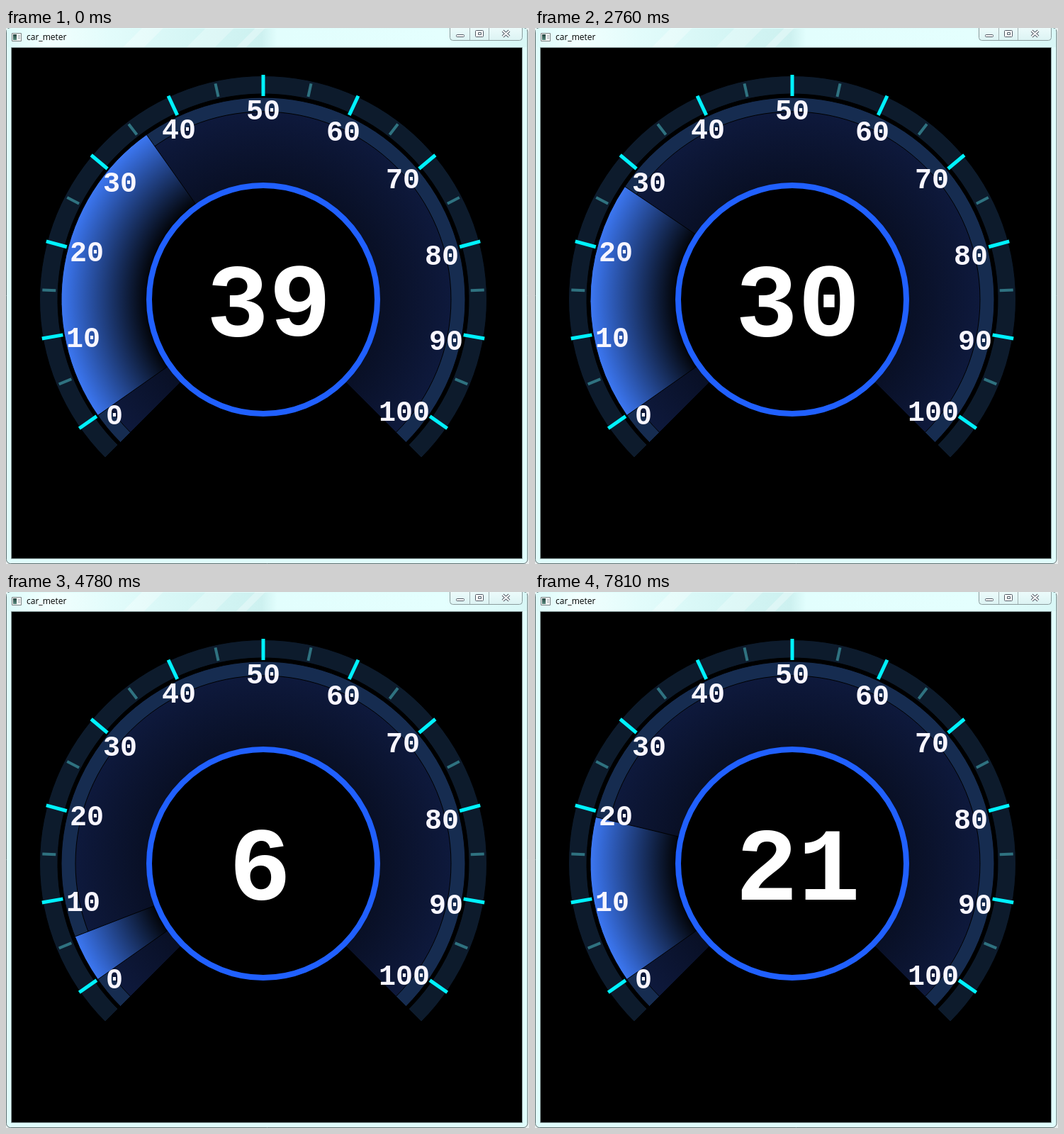
Recreate the animation shown at these times as an HTML page with a canvas. Size 738 px wide and 756 px high, loop 8040 ms.

```html
<!DOCTYPE html>
<html lang="en">
<head>
<meta charset="utf-8">
<title>car_meter</title>
<style>
  html, body { margin: 0; width: 100%; height: 100%; overflow: hidden; background: #000; }
  canvas { display: block; }
</style>
</head>
<body>
<canvas id="stage" width="738" height="756"></canvas>
<script>
const ctx = document.getElementById('stage').getContext('2d');
const LOOP = 8040;
const CX = 363, CY = 383;
const START = 145, TICK_STEP = 12.5, DEG_PER_UNIT = 2.3;
const MONO = '"Liberation Mono", monospace';

// [start time in ms, speed]
const readings = [[0, 39], [760, 58], [1750, 4], [2760, 30], [3770, 77],
                  [4780, 6], [5790, 73], [6800, 86], [7810, 21]];

// Centres of the scale labels 0, 10, ... 100
const labels = [[153, 545], [109, 436], [114, 315], [161, 217], [244, 142], [363, 115],
                [476, 145], [560, 212], [615, 320], [621, 440], [562, 540]];

const rad = deg => deg * Math.PI / 180;

function linear(x0, y0, x1, y1, ...stops) {
  const g = ctx.createLinearGradient(x0, y0, x1, y1);
  stops.forEach(([at, color]) => g.addColorStop(at, color));
  return g;
}

function radial(r0, r1, from, to) {
  const g = ctx.createRadialGradient(CX, CY, r0, CX, CY, r1);
  g.addColorStop(0, from);
  g.addColorStop(1, to);
  return g;
}

function box(x, y, w, h, radius, fill, stroke) {
  ctx.beginPath();
  ctx.roundRect(x, y, w, h, radius);
  if (fill) { ctx.fillStyle = fill; ctx.fill(); }
  if (stroke) { ctx.strokeStyle = stroke; ctx.lineWidth = 1; ctx.stroke(); }
}

function pie(r, from, to, fill) {
  ctx.beginPath();
  ctx.moveTo(CX, CY);
  ctx.arc(CX, CY, r, rad(from), rad(to));
  ctx.closePath();
  ctx.fillStyle = fill;
  ctx.fill();
  ctx.strokeStyle = '#000';
  ctx.lineWidth = 1;
  ctx.stroke();
}

function tick(deg, r0, r1, width, color) {
  const c = Math.cos(rad(deg)), s = Math.sin(rad(deg));
  ctx.beginPath();
  ctx.moveTo(CX + r0 * c, CY + r0 * s);
  ctx.lineTo(CX + r1 * c, CY + r1 * s);
  ctx.strokeStyle = color;
  ctx.lineWidth = width;
  ctx.stroke();
}

function text(str, x, y, font, color, align = 'center') {
  ctx.font = font;
  ctx.fillStyle = color;
  ctx.textAlign = align;
  ctx.fillText(str, x, y);
}

function sheen(x, width, color) {
  ctx.beginPath();
  ctx.moveTo(x, 27);
  ctx.lineTo(x + 27, 0);
  ctx.lineTo(x + 27 + width, 0);
  ctx.lineTo(x + width, 27);
  ctx.fillStyle = color;
  ctx.fill();
}

function drawWindow() {
  ctx.fillStyle = '#e8eeee';
  ctx.fillRect(0, 0, 738, 756);
  box(0.5, -0.5, 735.5, 756, 6, '#e0fdfc', '#5f6f70');
  ctx.fillStyle = linear(1, 0, 735, 0, [0, '#dcfbfa'], [0.08, '#f2fffe'], [0.2, '#e2fcfb'],
    [0.38, '#d3f5f4'], [0.49, '#cdf1f0'], [0.52, '#e2fefd'], [0.84, '#e4fffe'], [1, '#d8f7f6']);
  ctx.fillRect(1, 1, 734, 26);
  sheen(165, 30, 'rgba(255,255,255,.3)');
  sheen(255, 40, 'rgba(255,255,255,.25)');
  sheen(325, 14, 'rgba(255,255,255,.3)');
  box(7.5, 27.5, 721, 721, 0, '#000', '#8ea3a3');

  // Application icon and title
  box(8.5, 7.5, 13, 11, 0, '#f4f6f6', '#7c8484');
  ctx.fillStyle = linear(10, 9, 10, 17, [0, '#25433f'], [1, '#5b8d80']);
  ctx.fillRect(10, 9, 5, 8);
  ctx.fillStyle = '#a9b2b5';
  for (const y of [10, 12, 14]) ctx.fillRect(17, y, 3, 1);
  text('car_meter', 29, 17, '12px "Open Sans", sans-serif', '#000', 'left');

  // Minimise, maximise and close buttons
  box(626.5, -4.5, 102, 22, 4, linear(0, 0, 0, 17, [0, '#ecfbfb'], [1, '#dcf3f3']), '#8b9c9d');
  ctx.fillStyle = '#a3b3b4';
  ctx.fillRect(654, 0, 1, 17);
  ctx.fillRect(681, 0, 1, 17);
  box(635.5, 9.5, 11, 3, 1, '#fff', '#535b66');
  box(662.5, 3.5, 11, 9, 1, '#fff', '#535b66');
  box(666.5, 6.5, 4, 3, 0, '#e4f6f6', '#535b66');
  for (const [width, color] of [[4, '#535b66'], [2, '#fff']]) {
    ctx.beginPath();
    ctx.moveTo(701, 4); ctx.lineTo(710, 12);
    ctx.moveTo(710, 4); ctx.lineTo(701, 12);
    ctx.strokeStyle = color;
    ctx.lineWidth = width;
    ctx.stroke();
  }
}

function drawGauge(speed) {
  pie(315.5, 135, 405, '#0d1b2c');
  pie(290, 134, 406, '#000');
  pie(285, 135, 405, '#162c50');
  pie(265, 135, 405, radial(0, 265, '#000', '#0e193c'));
  pie(285, START, START + speed * DEG_PER_UNIT, radial(160, 285, '#000', '#3c77f2'));

  ctx.beginPath();
  ctx.arc(CX, CY, 161, 0, 2 * Math.PI);
  ctx.fillStyle = '#000';
  ctx.fill();
  ctx.strokeStyle = '#2060ff';
  ctx.lineWidth = 8;
  ctx.stroke();

  for (let i = 0; i <= 20; i++) {
    const deg = START + i * TICK_STEP;
    if (i % 2) tick(deg, 293, 312, 4, '#2f7280');
    else tick(deg, 287, 317, 5, '#00f2ff');
  }
  labels.forEach(([x, y], i) => text(i * 10, x, y + 13.5, `bold 40px ${MONO}`, '#f8f6ff'));
  text(speed, speed < 10 ? 358.5 : 371, 433.5, `bold 146.67px ${MONO}`, '#fff');
}

function frame() {
  const t = performance.now() % LOOP;
  const [, speed] = readings.findLast(([start]) => start <= t);
  drawWindow();
  drawGauge(speed);
  requestAnimationFrame(frame);
}
frame();
</script>
</body>
</html>
```
